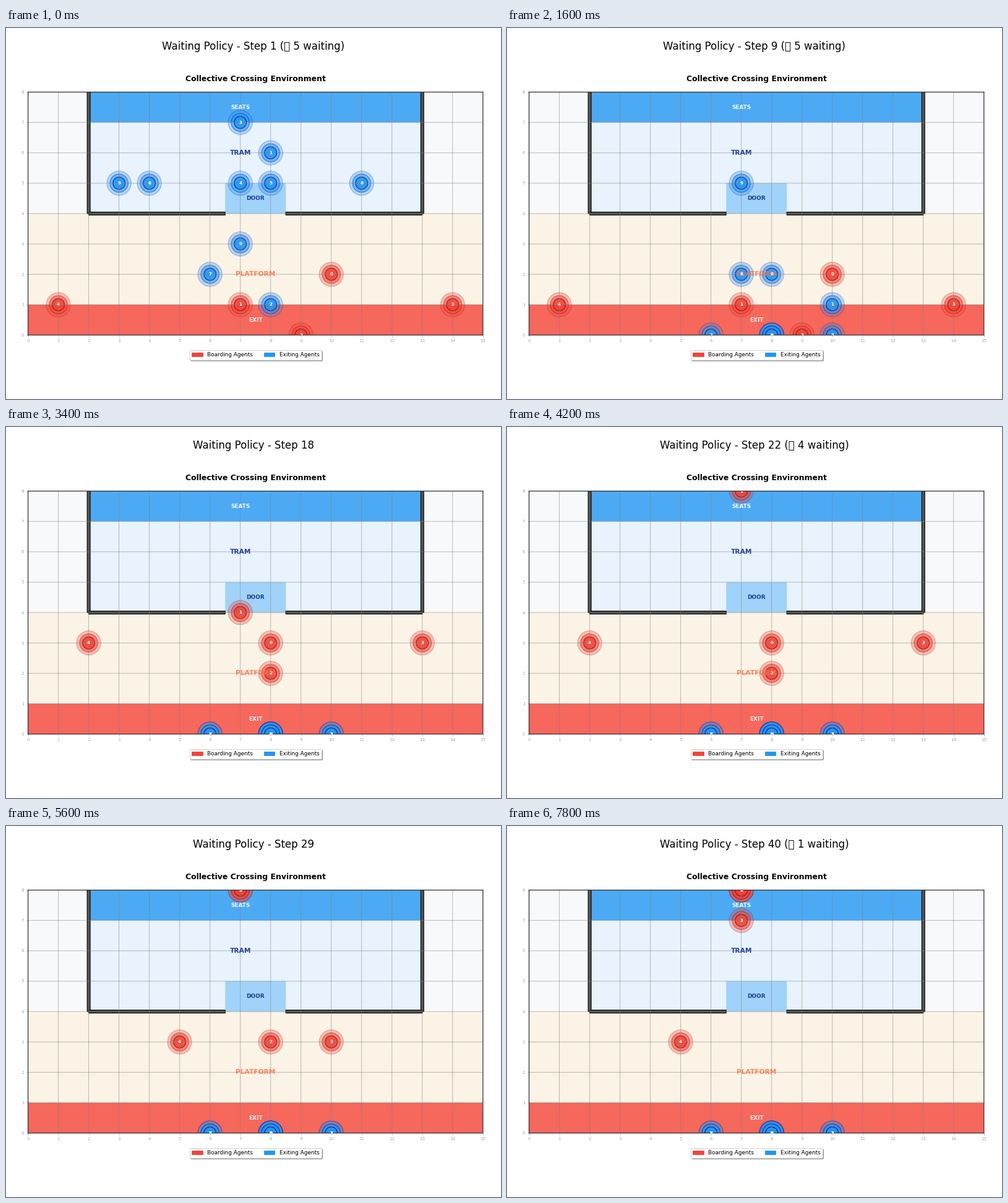
A matplotlib script for the animation above (8 s loop, 800x600 px).

```python
import matplotlib.pyplot as plt
from matplotlib.animation import FuncAnimation
from matplotlib.patches import Circle, Patch, Rectangle

W, H, DPI = 800, 600, 64
STEPS = 40
RED, BLUE = "#F44336", "#2196F3"
MOVES = {"U": (0, 1), "D": (0, -1), "L": (-1, 0), "R": (1, 0), ".": (0, 0)}

# Start cell and one move per step; a dot means the agent stays put.
HOLD = "." * 15
BOARDING = [
    (10, 2, HOLD + "ULL....LUUUUU"),
    (7, 1, HOLD + "UUUUUUU"),
    (9, 0, HOLD + "UUL..........ULUUUUU"),
    (14, 1, HOLD + "UUL....LL....LLL....LUUUU"),
    (1, 1, HOLD + "UUR....RR....R"),
]
EXITING = [
    (7, 3, ".DRDD"),
    (8, 6, "..DDDRDDRD"),
    (8, 1, ".D"),
    (7, 7, ".DDDDDRDD"),
    (7, 5, ".DDDRDD"),
    (8, 5, ".DDRDDRD"),
    (11, 5, ".LL..LDDDDD"),
    (6, 2, ".DD"),
    (4, 5, ".RR..RDDDLDD"),
    (3, 5, ".....RRRRDDDRDD"),
]

plt.rcParams["font.family"] = "DejaVu Sans"
fig = plt.figure(figsize=(W / DPI, H / DPI), dpi=DPI, facecolor="white")
ax = fig.add_axes([35.6 / W, 1 - 496.6 / H, 735.2 / W, 393 / H])
ax.set(xlim=(0, 15), ylim=(0, 8), xticks=range(16), yticks=range(9))
ax.set_facecolor("#F8F9FA")
ax.tick_params(labelsize=8, labelcolor="#AAAAAA", color="#AAAAAA")
ax.grid(True, color="gray", alpha=0.6, linewidth=1, snap=False)
for spine in ax.spines.values():
    spine.set(color="#333333", linewidth=1.4, snap=False)
ax.set_title("Collective Crossing Environment", fontsize=14.1,
             fontweight="bold", pad=20)
header = fig.text(0.5, 1 - 35 / H, "", fontsize=18.75, ha="center",
                  va="baseline")


def area(x, y, w, h, color):
    ax.add_patch(Rectangle((x, y), w, h, facecolor=color, alpha=0.8,
                           edgecolor="none", snap=False))


def wall(x, y, w, h):
    ax.add_patch(Rectangle((x, y), w, h, facecolor="#4A4A4A",
                           edgecolor="#111111", linewidth=1.3, snap=False))


def label(x, y, text, size, color, alpha=0.9):
    return ax.text(x, y, text, fontsize=size, color=color, alpha=alpha,
                   fontweight="bold", ha="center", va="center", clip_on=True)


area(2, 4, 11, 3, "#E5F2FE")
area(2, 7, 11, 1, BLUE)
area(0, 1, 15, 3, "#FDF2E2")
area(0, 0, 15, 1, "#F64234")
area(6.5, 4, 2, 1, "#90CAF9")
wall(1.95, 4, 0.1, 4)
wall(12.95, 4, 0.1, 4)
wall(2, 3.95, 4.5, 0.1)
wall(8.5, 3.95, 4.5, 0.1)
label(7, 6, "TRAM", 12, "#1A2F8A")
label(7, 7.5, "SEATS", 10, "white")
label(7.5, 4.5, "DOOR", 10, "#0D2A8A")
label(7.5, 2, "PLATFORM", 12, "#FF7043", 0.85)
label(7.5, 0.5, "EXIT", 10, "white")


class Agent:
    def __init__(self, name, start, color, edge):
        self.x, self.y, path = start
        self.path = path.ljust(STEPS, ".")
        self.rings = [
            ax.add_patch(Circle((0, 0), r, facecolor=color, edgecolor=edge,
                                alpha=a, linewidth=lw))
            for r, a, lw in ((0.4, 0.3, 1), (0.3, 0.5, 1), (0.2, 0.8, 1.2))
        ]
        self.tag = label(0, 0, name, 8, "white", 1)

    def place(self, step):
        moves = [MOVES[m] for m in self.path[:step]]
        x = self.x + sum(m[0] for m in moves)
        y = self.y + sum(m[1] for m in moves)
        for ring in self.rings:
            ring.center = (x, y)
        self.tag.set_position((x, y))
        return y

    def waits(self, step):
        return self.place(step) < 8 and self.path[step - 1] == "."


boarders = [Agent(str(i), s, RED, "#8B0000") for i, s in enumerate(BOARDING)]
leavers = [Agent(str(i), s, BLUE, "#00008B") for i, s in enumerate(EXITING)]

ax.legend(handles=[Patch(color=RED, label="Boarding Agents"),
                   Patch(color=BLUE, label="Exiting Agents")],
          loc="upper center", bbox_to_anchor=(0.5, -0.05), ncol=2,
          fontsize=10, fancybox=True, shadow=True)


def update(i):
    step = i + 1
    waiting = sum(a.waits(step) for a in boarders)
    for a in leavers:
        a.place(step)
    note = f" (\U0001F6A6 {waiting} waiting)" if waiting else ""
    header.set_text(f"Waiting Policy - Step {step}{note}")
    return []


anim = FuncAnimation(fig, update, frames=STEPS, interval=200, repeat=True,
                     repeat_delay=0, init_func=lambda: update(0), blit=False)
plt.show()
```
